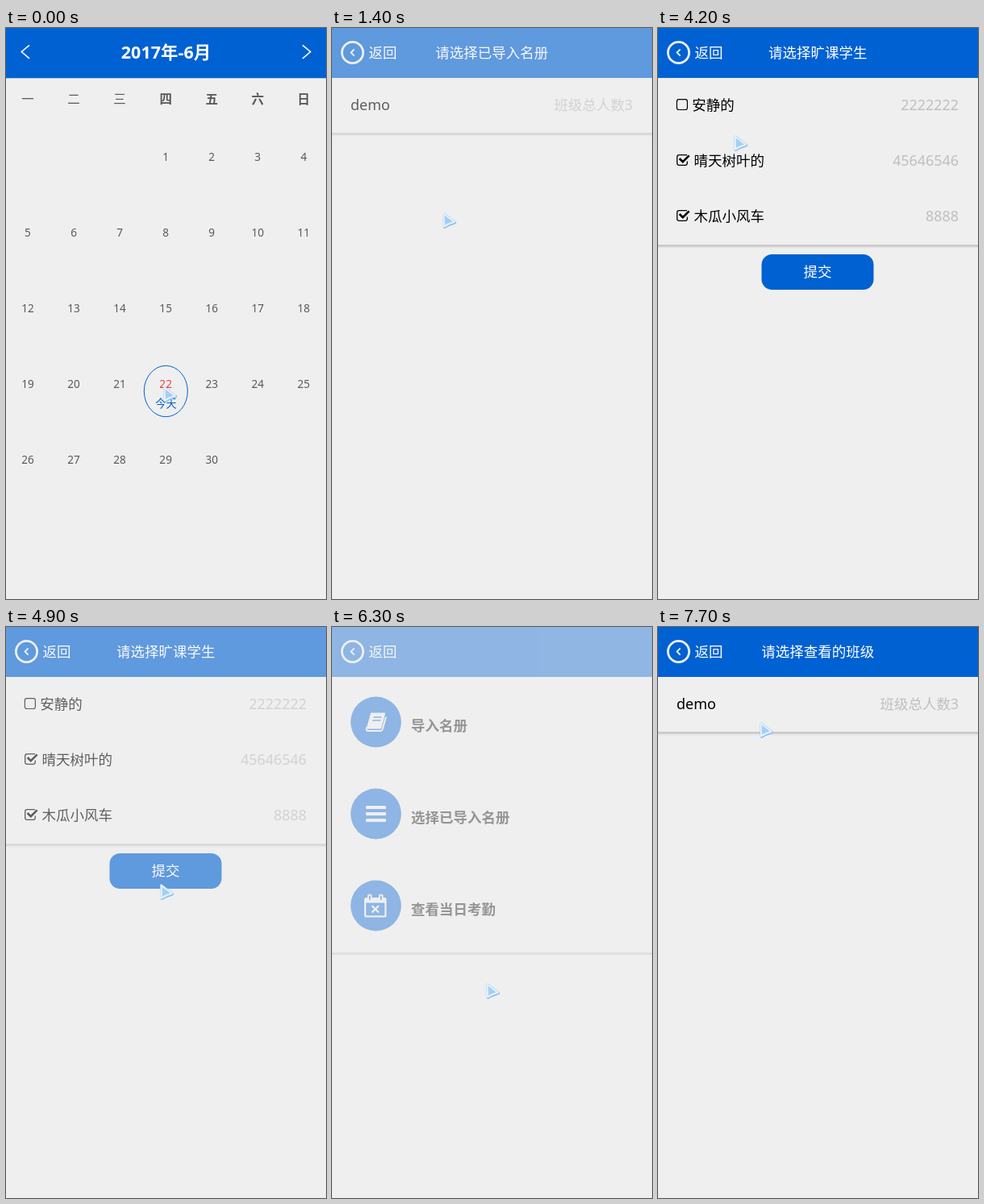
Write an HTML page that moves like this. It is 397x709 px and loops after 8000 ms.

```html
<!DOCTYPE html>
<html lang="zh-CN">
<head>
<meta charset="utf-8">
<title>考勤日历</title>
<style>
  html, body { margin: 0; width: 100%; height: 100%; overflow: hidden; background: #efefef; }
  svg { display: block; }
  text { font-family: "Noto Sans", "Noto Sans CJK SC", "Noto Sans CJK", sans-serif; white-space: pre; }
</style>
</head>
<body>
<svg id="stage" width="397" height="709" viewBox="0 0 397 709"></svg>
<script>
const BLUE = '#0061d3', PALE = '#efefef', GREY = '#bfbfbf', INK = '#5a5a5a';
const STEP = 700, LOOP = 8000;

const text = (x, y, s, size = 17.5, fill = '#000', anchor = 'start', weight = 400) =>
  `<text x="${x}" y="${y}" font-size="${size}" fill="${fill}" text-anchor="${anchor}" font-weight="${weight}">${s}</text>`;
const line = (d, width, color = PALE) =>
  `<path d="${d}" fill="none" stroke="${color}" stroke-width="${width}"/>`;
const rect = (x, y, w, h, fill, rx = 0) =>
  `<rect x="${x}" y="${y}" width="${w}" height="${h}" rx="${rx}" fill="${fill}"/>`;

const bar = () => rect(0, 0, 397, 62, BLUE);
const divider = y => ['#cdcdcd', '#c6c6c6', '#d6d6d6', '#e4e4e4', '#ebebeb']
  .map((color, i) => rect(0, y - 1 + i, 397, 1, color)).join('');

function header(title) {
  return bar() +
    `<circle cx="25.5" cy="30.5" r="13.1" fill="none" stroke="${PALE}" stroke-width="2.8"/>` +
    line('M27.6 26.4 23.6 30.5 27.6 34.6', 1.9) +
    text(45.5, 37, '返回', 17.5, '#fff') + text(198.3, 37, title, 17.5, '#fff', 'middle');
}

function calendar() {
  let out = bar() + rect(0, 62, 397, 1, '#b4c6dd') +
    line('M29 21.3 19.3 29.5 29 37.8', 1.6, '#fff') + line('M368 21.3 377.7 29.5 368 37.8', 1.6, '#fff') +
    text(198.5, 38, '2017年-6月', 21.5, '#fff', 'middle', 700);
  const column = i => 27 + 57.05 * i;
  [...'一二三四五六日'].forEach((day, i) =>
    out += text(column(i), 94, day, 15.5, INK, 'middle', i < 3 ? 400 : 700));
  for (let day = 1; day <= 30; day++) {
    const cell = day + 2;
    out += text(column(cell % 7), 165 + 94 * Math.floor(cell / 7), day, 13.6,
      day === 22 ? '#e8403c' : INK, 'middle');
  }
  return out + `<ellipse cx="198.3" cy="451" rx="27" ry="31.7" fill="none" stroke="${BLUE}"/>` +
    text(198.5, 470.5, '今天', 13.2, BLUE, 'middle');
}

function menu() {
  const icons = [
    // book
    `<g stroke-linejoin="round">${line('M49 107.5H65L60 125.5H44Z', 2.2)}` +
      `<path d="M49 107.5H65L60 125.5H44Z" fill="${PALE}"/>` +
      line('M43.6 124Q41 129 45 129H60.5Q62 129 62.6 127L67 111.5', 2) +
      line('M51.5 112H61.5M50.3 116H60.3', 1.6, BLUE) + '</g>',
    // bars
    [222, 230, 238].map(y => rect(42, y, 25, 4, PALE, 1)).join(''),
    // calendar with a cross
    rect(40, 336, 27.5, 24.5, PALE, 2.5) + rect(42.2, 342.5, 23.1, 15.8, BLUE) +
      [44, 58].map(x => rect(x, 331.8, 5.6, 8.6, PALE, 2) + rect(x + 1.9, 333.6, 1.8, 5, BLUE)).join('') +
      line('M49.5 346 58 354.5M58 346 49.5 354.5', 2.4)
  ];
  const labels = ['导入名册', '选择已导入名册', '查看当日考勤'];
  return header('') + divider(405) + labels.map((label, i) =>
    `<circle cx="54.5" cy="${118 + 114 * i}" r="31.4" fill="${BLUE}"/>` + icons[i] +
    text(98, 128.5 + 114 * i, label, 17.5, '#111', 'start', 700)).join('');
}

const classes = title => header(title) + divider(131) + text(23, 102, 'demo', 18) +
  text(373, 102, '班级总人数3', 17.5, GREY, 'end');

function students(checked) {
  const rows = [['安静的', '2222222'], ['晴天树叶的', '45646546'], ['木瓜小风车', '8888']];
  return header('请选择旷课学生') + divider(270) + rows.map(([name, id], i) => {
    const y = 69 * i, on = checked.includes(i);
    const box = on
      ? line('M36 88.7H26.2Q23.7 88.7 23.7 91.2V98.8Q23.7 101.3 26.2 101.3H33.8Q36.3 101.3 36.3 98.8V96.5', 1.3, '#000') +
        line('M26.6 93 30.8 97.2 38.6 89.4', 2.7, '#000')
      : '<rect x="23.4" y="88.7" width="13" height="12.8" rx="2.5" fill="none" stroke="#000" stroke-width="1.2"/>';
    return `<g transform="translate(0 ${y})">${box}</g>` + text(on ? 44.5 : 42.2, 102 + y, name) +
      text(373, 102 + y, id, 17.9, GREY, 'end');
  }).join('') + rect(128.5, 281, 139, 44, BLUE, 13) + text(198, 309, '提交', 17.5, '#fff', 'middle');
}

function cursor(x, y) {
  const d = 'M2.5 2.5 3 18.5 8.5 15.5 16 12.8Z';
  return `<g transform="translate(${x} ${y})" stroke-linejoin="round">` +
    `<path d="${d}" transform="translate(.5 .8)" fill="none" stroke="#8fbdea" stroke-width="3.4"/>` +
    `<path d="${d}" fill="#a4cff3" stroke="#e4f1fc" stroke-width="2.2"/></g>`;
}

// page, opacity, cursor position
const scenes = [
  [calendar(), 1, 194, 444],
  [menu(), 1, 137, 229],
  [classes('请选择已导入名册'), .6, 136, 228],
  [classes('请选择已导入名册'), .6, 25, 92],
  [students([]), 1, 102, 118],
  [students([2]), 1, 25, 95],
  [students([1, 2]), 1, 93, 132],
  [students([1, 2]), .6, 190, 318],
  [calendar(), 1, 169, 362],
  [menu(), .4, 190, 441],
  [menu(), .67, 117, 360],
  [classes('请选择查看的班级'), 1, 125, 117]
];

const stage = document.getElementById('stage');
let shown = -1;
function draw(now) {
  const index = Math.floor(now % LOOP / STEP);
  if (index !== shown) {
    const [page, opacity, x, y] = scenes[shown = index];
    stage.innerHTML = `<g opacity="${opacity}">${page}</g>` + cursor(x, y);
  }
  requestAnimationFrame(draw);
}
draw(0);
</script>
</body>
</html>
```
